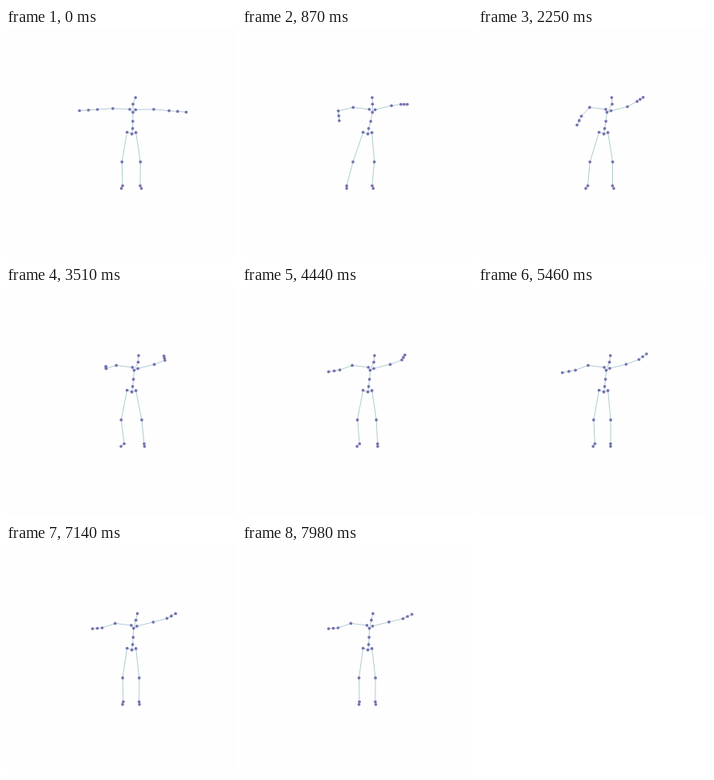
Write an HTML page that moves like this. It is 288 px wide and 288 px high and loops after 8000 ms.

```html
<!DOCTYPE html>
<html lang="en">
<head>
<meta charset="utf-8">
<title>Stick figure</title>
<style>
  html, body { margin: 0; width: 100%; height: 100%; overflow: hidden; background: #fefefe; }
  svg { display: block; width: 100vw; height: 100vh; }
  path { fill: none; stroke: #97c1c5; stroke-width: .8; }
  circle { fill: #7672b0; }
</style>
</head>
<body>
<svg viewBox="0 0 288 288"><path/></svg>
<script>
const LOOP = 8000, STEP = 30;
const WAVE_START = 870, WAVE_END = 3510, WAVE_PERIOD = 1320;

// Key poses. spine: x of chest, neck, head. Arms: wrist and fingertip points.
// Feet: x of the ankle, and how far the toe points sideways.
const poses = [
  { at: 0, spine: [159, 159, 162.2], leftArm: [114.5, 102, 92, 103.5],
    rightArm: [204.2, 103.6, 225.6, 105.3], leftFoot: [146, -1.5], rightFoot: [168, 1.5] },
  { at: 870, spine: [163.3, 163.5, 163], leftArm: [120.6, 103.8, 121.8, 116],
    rightArm: [199, 95.6, 207, 95.6], leftFoot: [131.1, 0], rightFoot: [163, 1.3] },
  { at: 2250, spine: [161.5, 168, 167.4], leftArm: [129.5, 110.3, 124, 121.5],
    rightArm: [199.2, 92, 206.8, 87], leftFoot: [137.5, -2.5], rightFoot: [168.4, 1.6] },
  { at: 3510, spine: [160.4, 165.5, 166], leftArm: [125.4, 103.4, 125, 100.6],
    rightArm: [199, 93, 197.8, 87.5], leftFoot: [148, -4], rightFoot: [173, .4] },
  { at: 5460, spine: [160.5, 164.6, 165.8], leftArm: [122, 105.4, 105.7, 108.5],
    rightArm: [201.5, 92, 211, 85], leftFoot: [146.4, -2.2], rightFoot: [166, 0] },
  { at: 7980, spine: [159.5, 162, 164], leftArm: [120.3, 105, 108.4, 106],
    rightArm: [201.6, 93.5, 212.8, 88], leftFoot: [147, -.5], rightFoot: [166.9, .6] }
];
const pelvis = [157.6, 132.7], lumbar = [158.6, 125.8];
const leftHip = [151.6, 130.5], rightHip = [162.7, 130.9];

const mix = (a, b, u) => a.map((v, i) => v + (b[i] - v) * u);
const smooth = u => u * u * (3 - 2 * u);
const easeOut = u => 1 - (1 - u) ** 3;

// The raised hand bobs twice, the second time lower.
function waveAt(time) {
  if (time < WAVE_START || time > WAVE_END) return 0;
  const t = time - WAVE_START;
  return 17 * (1 - t / 3300) * Math.sin(Math.PI * t / WAVE_PERIOD) ** 2;
}

function arm(chest, shoulder, elbowOffset, [wx, wy, tx, ty], lift = 0) {
  const elbow = [shoulder[0] + elbowOffset[0], shoulder[1] + elbowOffset[1]];
  const wrist = [wx, wy - lift / 2], tip = [tx, ty - lift];
  return [chest, shoulder, elbow, wrist, mix(wrist, tip, .5), tip];
}

// The knee bends outward and follows the direction of the foot.
function leg(hip, [ankleX, turn], bend) {
  const knee = [(hip[0] + ankleX) / 2 + bend + .8 * turn, 167.7];
  return [pelvis, hip, knee, [ankleX, 197.5], [ankleX + turn, 200.8]];
}

function chainsAt(time) {
  const k = Math.max(0, poses.findIndex(p => p.at > time) - 1);
  const from = poses[time >= poses.at(-1).at ? poses.length - 2 : k];
  const to = poses[poses.indexOf(from) + 1];
  const u = Math.min(1, (time - from.at) / (to.at - from.at));
  const part = (name, ease = smooth) => mix(from[name], to[name], ease(u));

  const [chestX, neckX, headX] = part('spine');
  const chest = [chestX, 105.6], lean = neckX - chestX;
  const leftShoulder = [chestX - 4 + .38 * lean, 101.8];
  const rightShoulder = [chestX + 3.3 + .28 * lean, 102.3 + .2 * lean];
  const spine = [lumbar[0] + .55 * (chestX - lumbar[0]), 116.8];
  const settle = smooth(Math.min(1, time / WAVE_START));

  return [
    [pelvis, lumbar, spine, chest, [neckX, 95.3], [headX, 87.1]],
    arm(chest, leftShoulder, mix([-21.2, -1], [-20.2, -2.4], settle), part('leftArm', easeOut)),
    arm(chest, rightShoulder, mix([22.7, -.5], [20.5, -5.1], settle), part('rightArm'), waveAt(time)),
    leg(leftHip, part('leftFoot'), -2.4),
    leg(rightHip, part('rightFoot'), 1.8)
  ];
}

const svg = document.querySelector('svg');
const bones = svg.querySelector('path');
const dots = [];

function addDot() {
  const dot = document.createElementNS(svg.namespaceURI, 'circle');
  dot.setAttribute('r', 1.85);
  return svg.appendChild(dot);
}

function draw(time) {
  const chains = chainsAt(time);
  bones.setAttribute('d', chains.map(c => 'M' + c.map(p => p.join(' ')).join('L')).join(''));
  [...new Set(chains.flat())].forEach(([x, y], n) => {
    const dot = dots[n] = dots[n] || addDot();
    dot.setAttribute('cx', x);
    dot.setAttribute('cy', y);
  });
}

const start = performance.now();
function tick() {
  const time = (performance.now() - start) % LOOP;
  draw(Math.floor(time / STEP) * STEP);
  requestAnimationFrame(tick);
}
tick();
</script>
</body>
</html>
```
